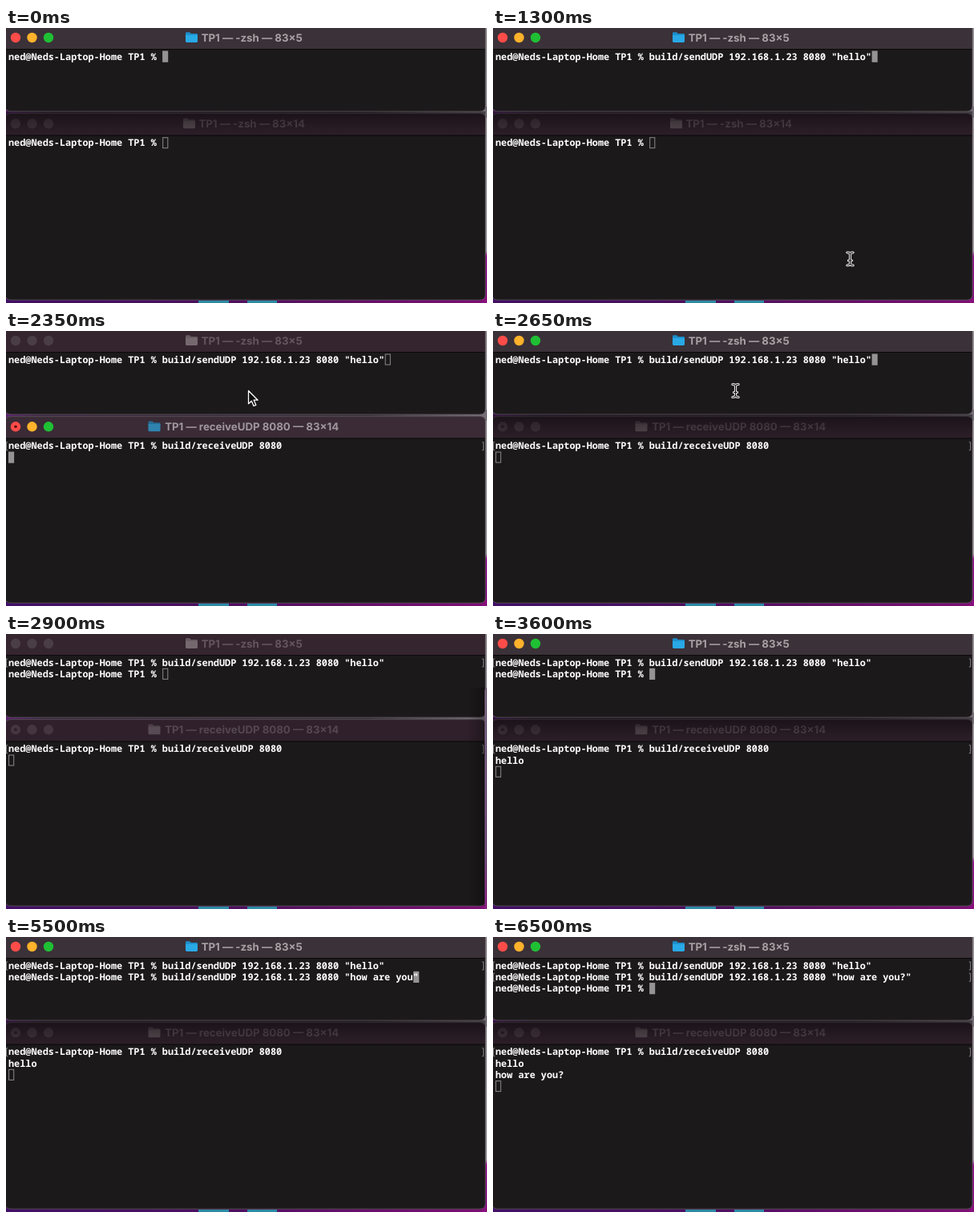
An HTML page for the animation above (6.85 s loop, 600 by 343 pixels).

```html
<!DOCTYPE html>
<html lang="en">
<head>
<meta charset="utf-8">
<title>Two terminals</title>
<style>
  html, body { margin: 0; width: 100%; height: 100%; overflow: hidden; background: #1c191b; }
  svg { display: block; width: 600px; height: 343px; }
  text { white-space: pre; text-rendering: geometricPrecision; }
  .row { font: 600 11.858px "Noto Sans Mono", "DejaVu Sans Mono", monospace; fill: #fff; }
  .title { font: 700 13.25px Inter, Roboto, sans-serif; text-anchor: middle; }
</style>
</head>
<body>
<svg id="stage" viewBox="0 0 600 343">
  <defs>
    <linearGradient id="floor">
      <stop offset="0" stop-color="#410f66"/>
      <stop offset=".45" stop-color="#4c0f5e"/>
      <stop offset="1" stop-color="#7d0f74"/>
    </linearGradient>
    <linearGradient id="side" x2="0" y2="1">
      <stop offset="0" stop-color="#9a959b"/>
      <stop offset=".81" stop-color="#a5a0a6"/>
      <stop offset=".83" stop-color="#98108f"/>
      <stop offset="1" stop-color="#86107c"/>
    </linearGradient>
    <linearGradient id="gap">
      <stop offset="0" stop-color="#5a1f70"/>
      <stop offset=".08" stop-color="#38263e"/>
      <stop offset=".75" stop-color="#39313a"/>
      <stop offset="1" stop-color="#77707a"/>
    </linearGradient>
    <linearGradient id="sheet" x2="0" y2="1">
      <stop offset="0" stop-color="#75657c"/>
      <stop offset=".75" stop-color="#6d4a78"/>
      <stop offset="1" stop-color="#86207f"/>
    </linearGradient>
    <linearGradient id="shadow" x2="0" y2="1">
      <stop offset="0" stop-opacity=".45"/>
      <stop offset="1" stop-opacity="0"/>
    </linearGradient>
    <linearGradient id="sideShadow">
      <stop offset="0" stop-opacity="0"/>
      <stop offset="1" stop-opacity=".3"/>
    </linearGradient>
  </defs>
  <rect y="336" width="600" height="7" fill="url(#floor)"/>
  <rect x="594" width="6" height="343" fill="url(#side)"/>
  <rect y="98" width="600" height="14" fill="url(#gap)"/>
  <path d="M240 340h38v3h-38zM301 340h37v3h-37z" fill="#2b8ba3"/>
</svg>
<script>
const LOOP = 6850, TICK = 50;
const CELL = 7.115, LINE = 14.3, LEFT = 3;
const PROMPT = "ned@Neds-Laptop-Home TP1 % ";
const SEND = 'build/sendUDP 192.168.1.23 8080 ';
const RECV = "build/receiveUDP 8080";
const stage = document.getElementById("stage");

function add(parent, tag, attrs) {
  const el = document.createElementNS("http://www.w3.org/2000/svg", tag);
  set(el, attrs);
  parent.append(el);
  return el;
}
function set(el, attrs) {
  for (const k in attrs) el.setAttribute(k, attrs[k]);
}
const show = (el, on) => set(el, { visibility: on ? "visible" : "hidden" });

// Colours of a title bar with and without focus, for the upper and lower window
const LIGHTS = ["#ff4c49", "#ffb22b", "#1fc034"];
const same = c => [c, c, c];
const LOOK = {
  topOn:     { bar: "#3b3138", text: "#a8a1a5", folder: "#29a9e6", tab: "#1b8cc8", lights: LIGHTS },
  bottomOn:  { bar: "#3a2b36", text: "#a0979d", folder: "#2f83ae", tab: "#256c92", lights: LIGHTS },
  topOff:    { bar: "#35252f", text: "#63565e", folder: "#75696f", tab: "#665b61", lights: same("#4b3d46") },
  bottomOff: { bar: "#2f202b", text: "#55474f", folder: "#584b53", tab: "#4c4048", lights: same("#44353f") }
};

function makeWindow(y, height, barHeight) {
  const g = add(stage, "g", { transform: `translate(0 ${y})` });
  const r = y ? 7 : 0;
  const outline = `M-1 ${r ? 7 : -8}q0 -7 7 -7H591q7 0 7 7V${height - 7}q0 7 -7 7H6q-7 0 -7 -7z`;
  add(g, "path", { d: outline, fill: "#1c191b" });
  const bar = add(g, "path", {
    d: r ? `M-1 ${barHeight}V7q0 -7 7 -7H591q7 0 7 7V${barHeight}z` : `M0 0H598V${barHeight}H0z`
  });
  add(g, "rect", { y: barHeight, width: 598, height: 1, fill: "#0b090a" });
  add(g, "path", { d: outline, fill: "none", stroke: "#5d565b", "stroke-width": 0.8 });
  const mid = y ? 12.7 : 12;
  const lights = [12, 32.5, 53].map(cx => add(g, "circle", { cx, cy: mid, r: 6.2 }));
  const dot = add(g, "circle", { cx: 12, cy: mid, r: 1.8 });
  const folder = add(g, "g", {});
  const tab = add(folder, "path", { d: "M0 -5.6q0 -1.2 1.2 -1.2h4l1.6 1.7h7q1.2 0 1.2 1.2v3H0z" });
  const front = add(folder, "path", { d: "M0 -3.2H15V4.6q0 1.4 -1.4 1.4H1.4q-1.4 0 -1.4 -1.4z" });
  const title = add(g, "text", { class: "title", x: 306.7, y: mid + 4.8 });
  const top = y ? 136.2 - y : 28.5;
  const cursor = add(g, "rect", {});
  const rows = [0, 1, 2, 3].map(i =>
    add(g, "text", { class: "row", x: LEFT, y: top + 11.1 + i * LINE }));
  const marks = [0, 1].map(i => {
    const t = top + 2.5 + i * LINE;
    return add(g, "path", {
      d: `M2.3 ${t}H.5V${t + 10}H2.3M593.8 ${t}H595.6V${t + 10}H593.8`,
      fill: "none", stroke: "#858284", "stroke-width": 1
    });
  });

  return (focused, w) => {
    const c = LOOK[(y ? "bottom" : "top") + (focused ? "On" : "Off")];
    set(bar, { fill: c.bar });
    lights.forEach((el, i) => set(el, { fill: c.lights[i] }));
    set(dot, { fill: focused ? "#5d1014" : "#2a1e27" });
    show(dot, w.busy);
    set(tab, { fill: c.tab });
    set(front, { fill: c.folder });
    set(folder, { transform: `translate(${w.iconX} ${mid})` });
    set(title, { fill: c.text });
    title.textContent = w.title;
    rows.forEach((el, i) => el.textContent = w.rows[i] || "");
    marks.forEach((el, i) => show(el, i < w.marks));
    const line = w.rows.length - 1;
    const x = LEFT + (w.rows[line].length - (w.back || 0)) * CELL, cy = top + line * LINE;
    set(cursor, focused
      ? { x, y: cy, width: CELL, height: 14.2, fill: "#969395", stroke: "none" }
      : { x: x + .6, y: cy + .5, width: CELL - 1, height: 13, fill: "none", stroke: "#8d8a8c" });
  };
}

const drawBottom = makeWindow(106.6, 232.6, 27);
const shadow = add(stage, "rect", { y: 104, width: 598, height: 34, fill: "url(#shadow)" });
const drawTop = makeWindow(0, 104, 26);

// Edge of a dialog that stands mostly off stage
const dialog = add(stage, "g", {});
add(dialog, "rect", { x: 575, y: 67, width: 22, height: 272, fill: "url(#sideShadow)" });
add(dialog, "path", { d: "M600 66.5q-3 1 -3 6V343H600z", fill: "url(#sheet)" });

const beam = add(stage, "g", { fill: "none", "stroke-linecap": "round" });
const beamPath = "M-3.6 -8Q0 -8 0 -5.5Q0 -8 3.6 -8M0 -5.5V5.5M-3.6 8Q0 8 0 5.5Q0 8 3.6 8M-2 2H2";
add(beam, "path", { d: beamPath, stroke: "#f2f2f2", "stroke-width": 3.2 });
add(beam, "path", { d: beamPath, stroke: "#111", "stroke-width": 1.1 });
const arrow = add(stage, "path", {
  d: "M0 0V16.2L3.8 12.7L6.5 19L9.3 17.8L6.6 11.7H11.6z",
  fill: "#0c0c0c", stroke: "#fff", "stroke-width": 1.3, "stroke-linejoin": "round"
});

const quoted = s => `${SEND}"${s}"`;
const steps = [
  [0, { focus: "top", sent: [], line: "", back: 0, running: false, input: "", got: [], dialog: false }],
  [50, { line: RECV }],
  [450, { line: quoted("hello") }],
  [1450, { focus: "bottom" }],
  [1650, { input: RECV }],
  [1850, { running: true }],
  [2600, { focus: "top" }],
  [2700, { sent: ["hello"], line: "" }],
  [2800, { focus: "none", dialog: true }],
  [3500, { got: ["hello"], dialog: false }],
  [3550, { focus: "top" }],
  [3950, { line: quoted("hello") }],
  [4250, { back: 1 }]
];
const edit = (word, ...times) =>
  times.forEach((t, i) => steps.push([t, { line: quoted(word(i)) }]));
edit(i => "hell".slice(0, 4 - i), 4350, 4400, 4450, 4500);
edit(i => "how are ".slice(0, 2 + i), 4800, 4850, 4900, 5050, 5100, 5150, 5250);
edit(i => "how are you?".slice(0, 10 + i), 5400, 5500, 5950);
steps.push([6050, { sent: ["hello", "how are you?"], got: ["hello", "how are you?"], line: "", back: 0 }]);

// Pointer trips: points of [time, x, y]; each ends when the pointer hides
const trips = [
  { end: 1650, path: [[950, 575, 190], [1300, 445.5, 288], [1450, 424, 298], [1600, 420, 298]] },
  { end: 2700, path: [[1900, 420, 298], [2050, 360, 180], [2200, 302.5, 74.5]] },
  { end: 3250, path: [[2950, 330, 82], [3250, 610, 190]] },
  { end: 6500, path: [[6350, 457, 74], [6450, 518, 59]] }
];

function pointerAt(t) {
  const trip = trips.find(p => t >= p.path[0][0] && t < p.end);
  if (!trip) return null;
  const p = trip.path, i = p.findIndex(q => q[0] > t);
  if (i < 0) return p[p.length - 1].slice(1);
  const [a, b] = [p[i - 1], p[i]], k = (t - a[0]) / (b[0] - a[0]);
  return [1, 2].map(n => a[n] + (b[n] - a[n]) * k);
}

function draw(t) {
  const s = {};
  for (const [at, patch] of steps) if (at <= t) Object.assign(s, patch);

  drawTop(s.focus === "top", {
    title: "TP1 — -zsh — 83×5", iconX: 224,
    rows: [...s.sent.map(w => PROMPT + quoted(w)), PROMPT + s.line],
    marks: s.sent.length, back: s.back
  });
  drawBottom(s.focus === "bottom", {
    title: s.running ? "TP1 — receiveUDP 8080 — 83×14" : "TP1 — -zsh — 83×14",
    iconX: s.running ? 177.5 : 221,
    rows: [PROMPT + s.input, ...(s.running ? [...s.got, ""] : [])],
    marks: s.running ? 1 : 0, busy: s.running
  });
  show(shadow, s.focus === "top");
  show(dialog, s.dialog);

  const p = pointerAt(t);
  const overText = p && (s.focus === "top" || (s.focus === "bottom" && p[1] > 134));
  show(beam, overText);
  show(arrow, p && !overText);
  if (p) set(overText ? beam : arrow, { transform: `translate(${p[0]} ${p[1]})` });
}

const start = performance.now();
let shown = -1;
function loop() {
  const t = Math.floor((performance.now() - start) % LOOP / TICK) * TICK;
  if (t !== shown) draw(shown = t);
  requestAnimationFrame(loop);
}
loop();
</script>
</body>
</html>
```
